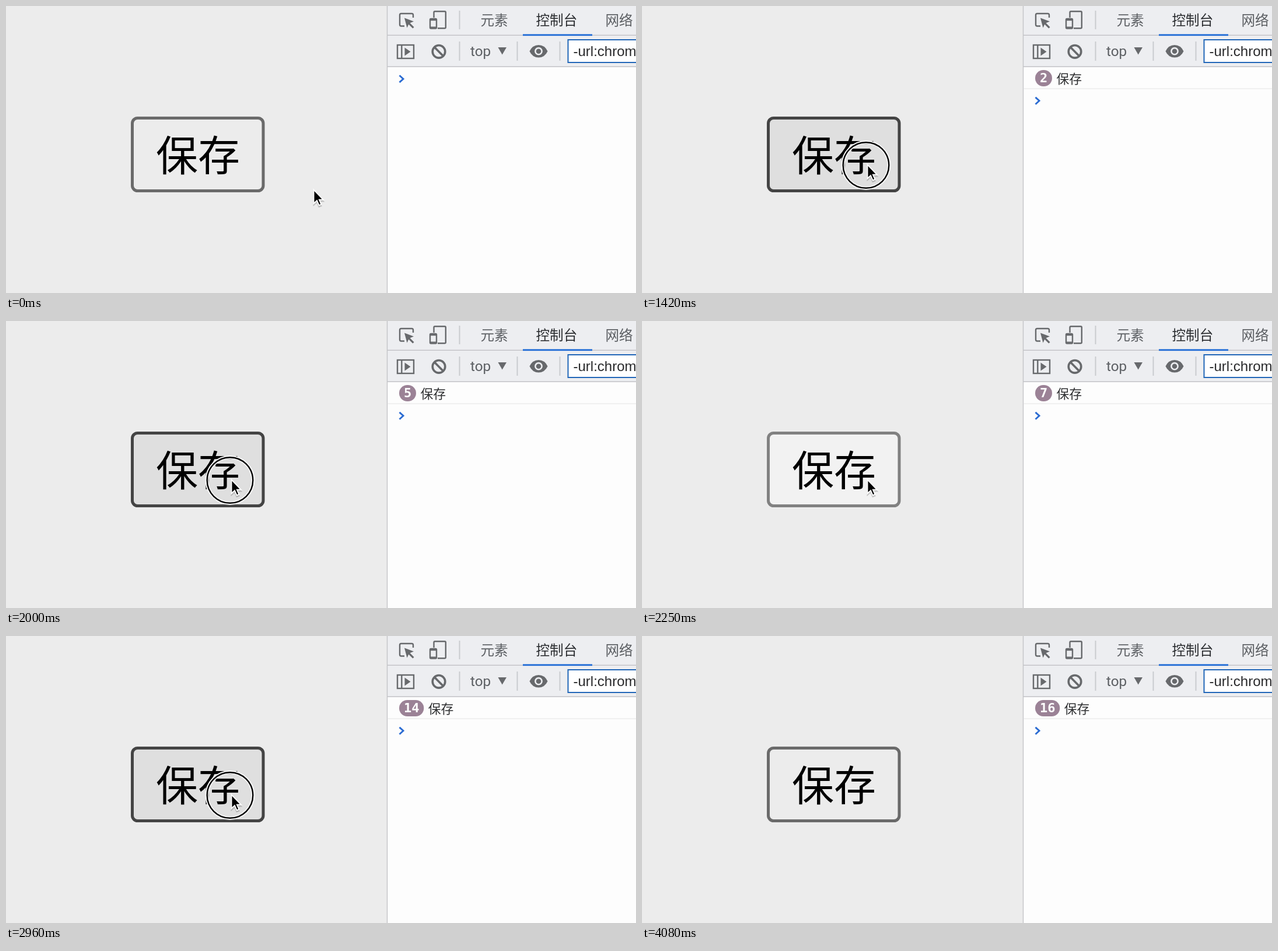
Animation of 1080x493 px, one loop 4.37 s. Source, as an HTML page:

```html
<!DOCTYPE html>
<html lang="zh">
<head>
<meta charset="utf-8">
<title>保存</title>
<style>
  html, body { margin: 0; width: 100%; height: 100%; overflow: hidden; background: #ececec; }
  svg { display: block; width: 1080px; height: 493px; }
  .cjk { font-family: "Noto Sans CJK SC", "Noto Sans CJK", sans-serif; }
  .tab { font-size: 23.6px; fill: #5c5f63; }
  .icon { fill: none; stroke: #67696c; stroke-width: 2.4; }
  .solid { fill: #67696c; }
  .sep { stroke: #c9cbcf; stroke-width: 2; }
</style>
</head>
<body>
<svg viewBox="0 0 1080 493">
  <rect width="1080" height="493" fill="#ececec"/>

  <!-- panel -->
  <rect x="654" width="426" height="493" fill="#fdfdfd"/>
  <rect x="654" width="426" height="104" fill="#edeef1"/>
  <path d="M653.5 0V493M654 50.3H1080M654 104.3H1080" stroke="#c3c4c7" stroke-width="1.4"/>
  <path class="sep" d="M777.5 8V40M777.5 61V94M876.5 61V94M949.5 61V94"/>
  <rect x="886" y="48.4" width="119" height="2.8" fill="#1f6bd6"/>

  <g class="cjk tab">
    <text x="813.5" y="33">元素</text>
    <text x="908.5" y="33" fill="#2b2d30">控制台</text>
    <text x="1027.5" y="33">网络</text>
  </g>

  <!-- toolbar icons -->
  <path class="icon" d="M683 34.5H677.5Q675 34.5 675 32V15.5Q675 13 677.5 13H695.5Q698 13 698 15.5V20"/>
  <path class="solid" d="M683 20.5L699 26.5L692.5 29.3L699.5 36.3L697.3 38.5L690.2 31.5L687.5 37.5Z"/>
  <path class="icon" d="M733.5 20V11Q733.5 9.2 735.3 9.2H752Q753.8 9.2 753.8 11V36.5Q753.8 38.3 752 38.3H740"/>
  <rect class="icon" x="727" y="22" width="11" height="16.5" rx="1.5"/>
  <path class="icon" d="M727 24H738M727 36.6H738"/>

  <rect class="icon" x="671" y="67" width="28" height="23"/>
  <path class="icon" d="M678.3 67V90"/>
  <path class="solid" d="M683.5 71.5L693.5 78.5L683.5 85.5Z"/>
  <g class="icon" style="stroke-width:3.6">
    <circle cx="742" cy="78.3" r="10.8"/>
    <path d="M734.4 70.7L749.6 85.9"/>
  </g>
  <path class="solid" d="M843.5 71H858L850.7 83.5Z"/>
  <path class="solid" d="M897.5 77.7Q902.5 67 913 67T928.5 77.7Q923.5 88.5 913 88.5T897.5 77.7Z"/>
  <circle cx="913" cy="77.7" r="5.6" fill="none" stroke="#edeef1" stroke-width="2.6"/>
  <text x="796" y="86" font-size="24.3" fill="#5c5f63" font-family="Roboto, sans-serif">top</text>

  <rect x="963.5" y="58" width="140" height="39" fill="#fff" stroke="#2166b8" stroke-width="2"/>
  <text x="972.5" y="86" font-size="24" fill="#28292b" font-family="'Liberation Sans', sans-serif">-url:chrom</text>

  <!-- console -->
  <g id="row">
    <path d="M654 142H1080" stroke="#ececec" stroke-width="1.6"/>
    <g id="badge">
      <rect id="pill" x="674" y="110" width="29" height="28" rx="14" fill="#9b8296"/>
      <text id="num" y="131.3" text-anchor="middle" font-size="22" font-weight="700" fill="#fff" font-family="'DejaVu Sans Mono', monospace"></text>
    </g>
    <text id="msg" class="cjk" y="133.3" font-size="21.8" fill="#2d2e30">保存</text>
  </g>
  <path id="prompt" d="M674.5 119.3L681 125.2L674.5 131.1" fill="none" stroke="#2a6bd2" stroke-width="2.9"/>

  <!-- button -->
  <rect id="btn" x="216.5" y="192.5" width="224.5" height="125" rx="9" stroke-width="5"/>
  <text class="cjk" x="257" y="282.5" font-size="72" fill="#000">保存</text>

  <g id="ring" fill="none">
    <circle cx="384" cy="273.5" r="39.5" stroke="#f6f6f6" stroke-width="6"/>
    <circle cx="384" cy="273.5" r="39.3" stroke="#000" stroke-width="2.4"/>
  </g>

  <g id="cursor">
    <path d="M1.5 2V26L7 21L10.5 29L14.5 27.5L11 19.5H18Z" fill="#000" opacity=".18" stroke="#000" stroke-width="2" transform="translate(0 2)"/>
    <path d="M1.5 1.5V25.3L7 20.2L10.6 28.3L14.4 26.7L10.9 18.8H18Z" fill="#000" stroke="#fff" stroke-width="1.9"/>
  </g>
</svg>
<script>
  const $ = id => document.getElementById(id);
  const LOOP = 4370, FPS = 24;

  const presses = [1000, 1340, 1665, 1782, 1898, 2012, 2126, 2240,
                   2330, 2420, 2510, 2600, 2760, 2880, 3000, 3125];
  const HOLD = 70, RING_LAG = 40;

  // time, x, y of the pointer
  const path = [
    [0, 526, 314], [120, 518, 311], [290, 484, 295], [460, 445, 279], [540, 427, 274],
    [625, 385, 271], [3600, 385, 271], [3680, 432, 190], [3750, 505, 75],
    [3790, 534, 27], [3980, 534, 27], [4080, 1036, 17]
  ];

  const styles = {
    idle:  ['#ececec', '#6a6a6a'],
    hover: ['#dfdfdf', '#444444'],
    down:  ['#f2f2f2', '#818181']
  };

  const show = (el, on) => el.setAttribute('visibility', on ? 'inherit' : 'hidden');

  function pointerAt(t) {
    const i = path.findIndex(p => p[0] > t);
    if (i < 0) return null;
    const [t0, x0, y0] = path[i - 1], [t1, x1, y1] = path[i];
    const k = (t - t0) / (t1 - t0);
    return { x: x0 + (x1 - x0) * k, y: y0 + (y1 - y0) * k };
  }

  const held = t => presses.some(p => t >= p && t < p + HOLD);

  function drawConsole(count) {
    const digits = String(count).length;
    const extra = (digits - 1) * 13.3;
    show($('row'), count > 0);
    show($('badge'), count > 1);
    $('pill').setAttribute('width', 29 + extra);
    $('num').setAttribute('x', 688.5 + extra / 2);
    $('num').textContent = count;
    $('msg').setAttribute('x', count > 1 ? 710.5 + extra : 702);
    $('prompt').setAttribute('transform', `translate(0 ${count ? 37.6 : 0})`);
  }

  function draw(t) {
    const p = pointerAt(t);
    const over = p && p.x > 214 && p.x < 444 && p.y > 190 && p.y < 320;
    const [fill, stroke] = styles[held(t) ? 'down' : over ? 'hover' : 'idle'];
    $('btn').setAttribute('fill', fill);
    $('btn').setAttribute('stroke', stroke);
    show($('ring'), held(t - RING_LAG + 5));
    show($('cursor'), p);
    if (p) $('cursor').setAttribute('transform', `translate(${p.x} ${p.y})`);
    drawConsole(presses.filter(s => t >= s + HOLD).length);
  }

  const start = performance.now();
  function tick() {
    const t = (performance.now() - start) % LOOP;
    draw(Math.floor(t * FPS / 1000 + 0.1) * 1000 / FPS);
    requestAnimationFrame(tick);
  }
  tick();
</script>
</body>
</html>
```
